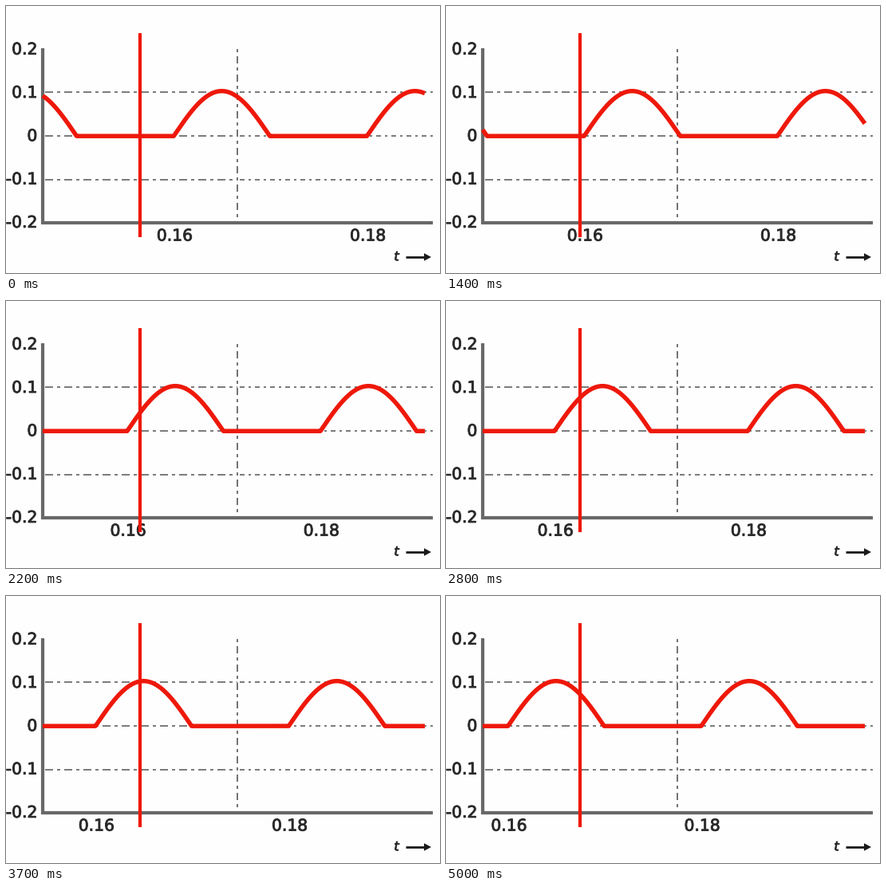
A matplotlib script for the animation above (5100 ms loop, 544x335 px).

```python
import numpy as np
import matplotlib.pyplot as plt
from matplotlib.animation import FuncAnimation
from matplotlib.patches import Polygon
from matplotlib.patheffects import withStroke

WIDTH, HEIGHT, DPI = 544, 335, 64
FRAMES, INTERVAL = 51, 100

RED, GREY, INK = "#ee180a", "#686868", "#2a2a2a"
ZERO_Y, AMPLITUDE = 163.2, 56.5    # baseline and bump height, px
PERIOD, BUMP = 242.2, 120.5        # 0.02 s on the axis, width of one bump
START_X, SPEED = 211.4, 2.65       # place of 0.16 at the start, px per frame
WAVE_SHIFT = -1.2                  # the wave sits slightly left of its labels
LEFT, RIGHT = 46, 525


def pt(px):
    return px * 72 / DPI


fig = plt.figure(figsize=(WIDTH / DPI, HEIGHT / DPI), dpi=DPI, facecolor="#fefefe")
ax = fig.add_axes([0, 0, 1, 1])
ax.set_xlim(0, WIDTH)
ax.set_ylim(HEIGHT, 0)
ax.axis("off")


def line(x, y, color, width, z, dashes=None):
    style = {"dashes": [d / width for d in dashes]} if dashes else {}
    return ax.plot(x, y, color=color, lw=pt(width), zorder=z,
                   solid_capstyle="butt", solid_joinstyle="round", **style)[0]


def label(x, y, text, ha, size=20.3, **style):
    effect = [withStroke(linewidth=pt(0.9), foreground=INK)]
    return ax.text(x, y, text, ha=ha, va="center_baseline", color=INK,
                   fontsize=pt(size), family="DejaVu Sans", zorder=4,
                   path_effects=effect, **style)


# Grid
for y in (108.2, ZERO_Y, 218.2):
    line([49, 290], [y, y], "#7c7c7c", 2, 1, (10, 5, 4, 5))
    line([293, 536], [y, y], "#7c7c7c", 2, 1, (6, 5, 3, 5))
line([290, 290], [54, 271], "#747474", 2, 1, (4, 5, 9, 5))

# Axes
line([46.4, 46.4], [53, 274], GREY, 4.2, 2)
line([44.5, 535], [272.2, 272.2], GREY, 4.2, 2)
for i, text in enumerate(("0.2", "0.1", "0", "-0.1", "-0.2")):
    label(39.4, 53.2 + 54.3 * i, text, "right")

# Time arrow
label(489.5, 313.3, "t", "center", 16, style="italic")
line([501, 526], [315, 315], "#1a1a1a", 2.8, 4)
ax.add_patch(Polygon([(524, 310.2), (533, 315), (524, 319.8)],
                     color="#1a1a1a", lw=0, zorder=4))

# Moving parts and the fixed cursor
xs = np.linspace(LEFT, RIGHT, 1200)
wave = line(xs, xs, RED, 5.5, 3)
ticks = [label(0, 287, text, "center") for text in ("0.16", "0.18")]
line([168, 168], [34, 290], RED, 4.2, 5)


def update(frame):
    origin = START_X - SPEED * frame
    phase = (xs - origin - WAVE_SHIFT) % PERIOD
    bump = np.where(phase < BUMP, np.sin(np.pi * phase / BUMP), 0)
    wave.set_ydata(ZERO_Y - AMPLITUDE * bump)
    for i, tick in enumerate(ticks):
        tick.set_x(origin + PERIOD * i)
    return [wave, *ticks]


anim = FuncAnimation(fig, update, frames=FRAMES, interval=INTERVAL,
                     repeat=True, repeat_delay=0, blit=False)
plt.show()
```
